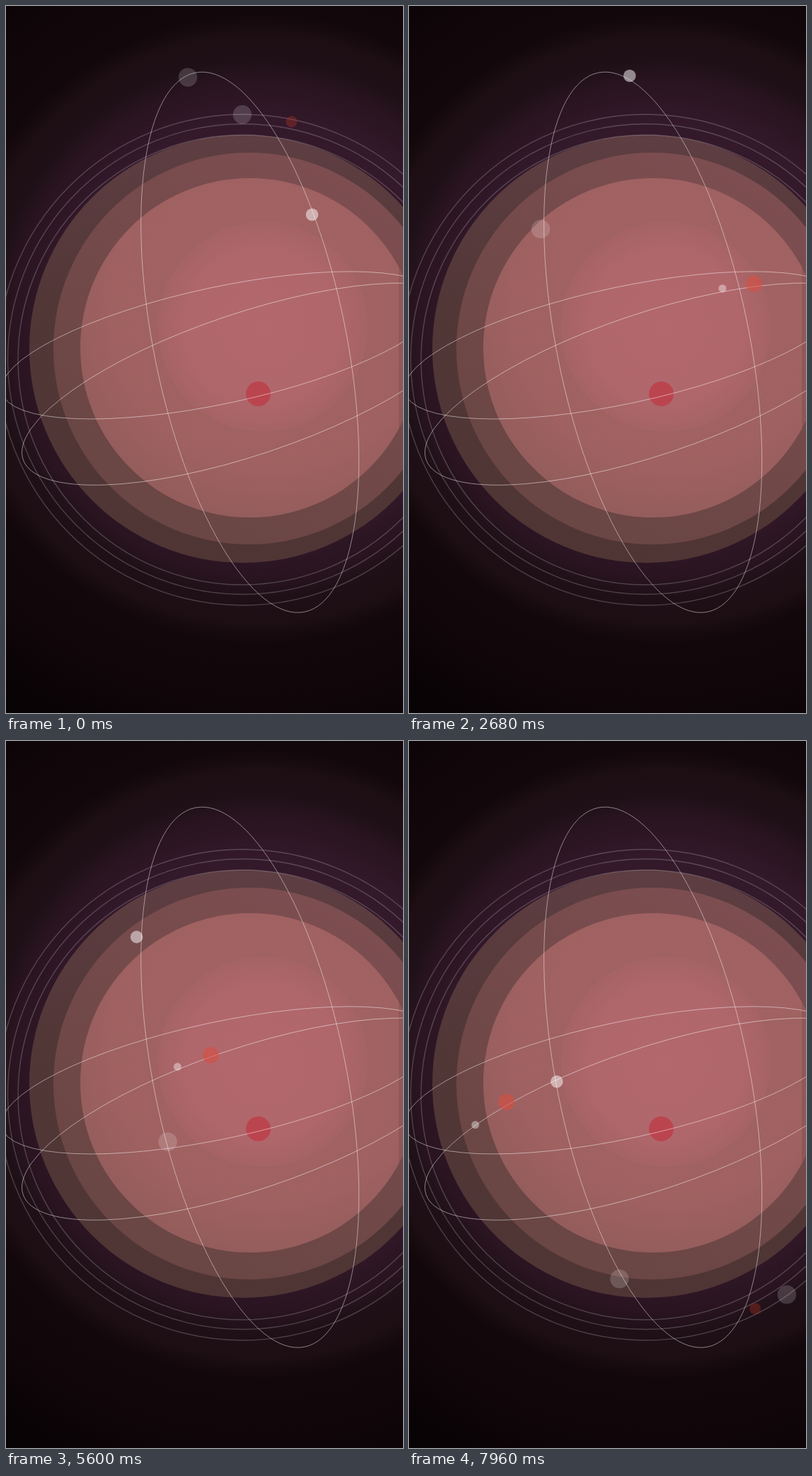
An HTML page that plays this animation: 561x998 px, repeating every 8 s.

```html
<!DOCTYPE html>
<html lang="en">
<head>
<meta charset="utf-8">
<title>Planet orbits</title>
<style>
  html, body { margin: 0; width: 100%; height: 100%; overflow: hidden; background: #0a0406; }
  svg { display: block; width: 100%; height: 100%; }
  .rings { fill: none; stroke: #fff; stroke-opacity: .2; stroke-width: 1.4; }
  .orbits { fill: none; stroke: #fff; stroke-opacity: .55; stroke-width: .8; }
</style>
</head>
<body>
<svg viewBox="0 0 561 998">
  <defs>
    <radialGradient id="space" gradientUnits="userSpaceOnUse" cx="358" cy="456" r="700">
      <stop offset=".42" stop-color="#33192a"/>
      <stop offset=".5" stop-color="#291420"/>
      <stop offset=".54" stop-color="#1f1017"/>
      <stop offset=".595" stop-color="#1c0e13"/>
      <stop offset=".635" stop-color="#12070a"/>
      <stop offset=".76" stop-color="#100609"/>
      <stop offset=".86" stop-color="#090305"/>
      <stop offset="1" stop-color="#050203"/>
    </radialGradient>
    <linearGradient id="outer" x2="0" y2="1">
      <stop offset="0" stop-color="#5e3e42"/>
      <stop offset=".4" stop-color="#523737"/>
      <stop offset="1" stop-color="#503535"/>
    </linearGradient>
    <linearGradient id="middle" x1=".7" y1="0" x2=".2" y2=".8">
      <stop offset="0" stop-color="#7e4e51"/>
      <stop offset="1" stop-color="#6a4644"/>
    </linearGradient>
    <radialGradient id="inner" gradientUnits="userSpaceOnUse" cx="375" cy="425" r="320">
      <stop offset="0" stop-color="#a36365"/>
      <stop offset=".7" stop-color="#a06161"/>
      <stop offset="1" stop-color="#915c5b"/>
    </radialGradient>
    <radialGradient id="core">
      <stop offset="0" stop-color="#b2686d"/>
      <stop offset=".7" stop-color="#b0676c"/>
      <stop offset="1" stop-color="#a56365"/>
    </radialGradient>
    <clipPath id="innerClip"><circle cx="344.5" cy="482.5" r="239.5"/></clipPath>
  </defs>

  <rect width="561" height="998" fill="url(#space)"/>
  <circle cx="335" cy="484" r="302" fill="url(#outer)"/>
  <circle cx="343.5" cy="483.5" r="276.5" fill="url(#middle)"/>
  <circle cx="344.5" cy="482.5" r="239.5" fill="url(#inner)"/>
  <circle cx="363" cy="453" r="148" fill="url(#core)"/>
  <rect x="555" y="230" width="6" height="500" fill="#6a4343" opacity=".3" clip-path="url(#innerClip)"/>
  <circle cx="356.5" cy="547.5" r="17.5" fill="#bb454f"/>

  <g class="rings">
    <circle cx="334.5" cy="499.5" r="317.5"/>
    <circle cx="334.5" cy="498.5" r="332"/>
    <circle cx="334.5" cy="499.5" r="346.5"/>
  </g>
  <g class="orbits">
    <ellipse rx="388.3" ry="136" transform="translate(344.7 474.7) rotate(78.53)"/>
    <ellipse rx="316.1" ry="82.2" transform="translate(303.2 478.9) rotate(-12.07)"/>
    <ellipse rx="334.5" ry="100" transform="translate(341.2 533.7) rotate(-18.56)"/>
  </g>
  <g id="moons"></g>
</svg>
<script>
const LOOP = 8000, STEP = 40;
const SVG = 'http://www.w3.org/2000/svg';

const tallPath = `M432.5 294.5 C417 228 338 90 287 89.5
  C238 89.5 194 180 184.5 265 C184 400 228 620 304 773`;
const redPath = 'M675 388 C500 366 300 425 123 517';
const palePath = 'M635 384 C450 379 255 428 79 552';

// Constant speed along a curve, in pixels per millisecond
function along(d, speed, delay = 0) {
  const path = document.createElementNS(SVG, 'path');
  path.setAttribute('d', d);
  return t => path.getPointAtLength(speed * (t + delay));
}

// Constant turn around a centre, in degrees per second
function around(cx, cy, radius, start, turn) {
  return t => {
    const angle = (start + turn * t / 1000) * Math.PI / 180;
    return { x: cx + radius * Math.cos(angle), y: cy + radius * Math.sin(angle) };
  };
}

function moon(r, fill, place) {
  const node = document.createElementNS(SVG, 'circle');
  node.setAttribute('r', r);
  node.setAttribute('fill', fill);
  document.getElementById('moons').append(node);
  return { node, place };
}

const moons = [
  moon(13.2, 'rgba(255,255,255,.17)', around(334.5, 499, 345.7, -90.1, 18.2)),
  moon(8, 'rgba(185,55,35,.33)', around(338, 497, 340, -78.9, 17.9)),
  moon(13.2, 'rgba(255,255,255,.17)', along(tallPath, .0872, 3360)),
  moon(8.8, 'rgba(255,255,255,.5)', along(tallPath, .0872)),
  moon(11.5, 'rgba(216,78,66,.6)', along(redPath, .0702)),
  moon(5.5, 'rgba(255,255,255,.4)', along(palePath, .072))
];

const begin = performance.now();
function tick() {
  const t = Math.floor((performance.now() - begin) % LOOP / STEP) * STEP;
  for (const { node, place } of moons) {
    const { x, y } = place(t);
    node.setAttribute('cx', x);
    node.setAttribute('cy', y);
  }
  requestAnimationFrame(tick);
}
tick();
</script>
</body>
</html>
```
